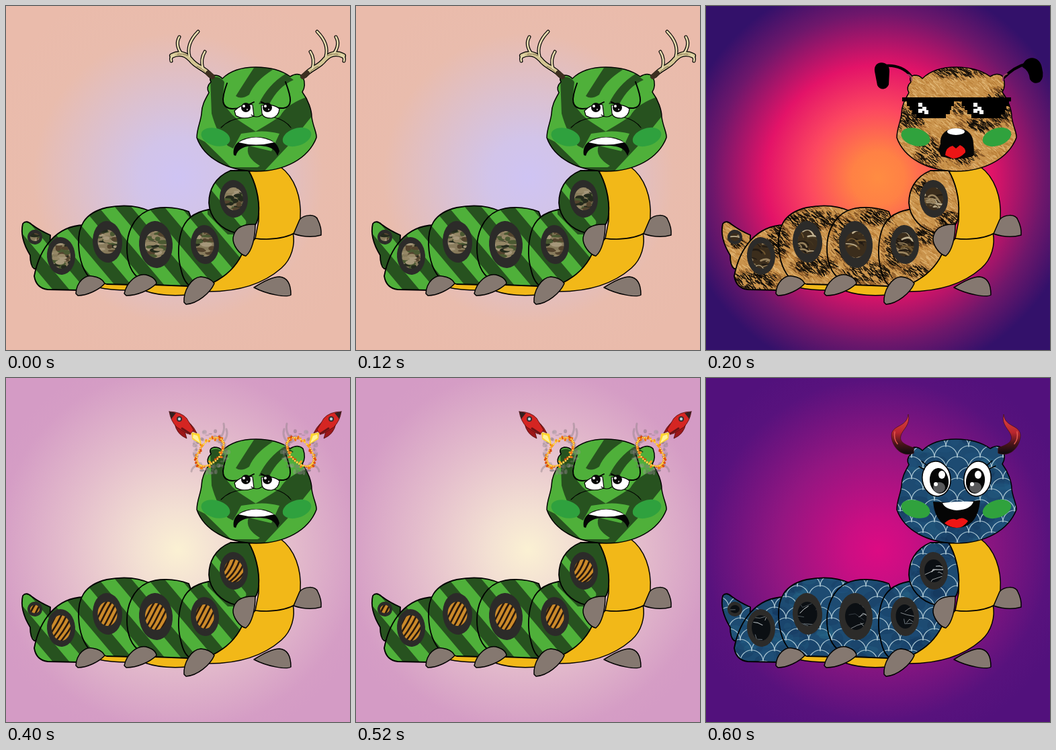
Animation, 512 px wide and 512 px high, one loop 0.8 s. Source, as an HTML page with a canvas:

```html
<!DOCTYPE html>
<html lang="en">
<head>
<meta charset="utf-8">
<title>Caterpillar costumes</title>
<style>
html, body { margin: 0; width: 100%; height: 100%; overflow: hidden; }
canvas { display: block; width: 100vw; height: 100vh; }
</style>
</head>
<body>
<canvas id="stage" width="512" height="512"></canvas>
<script>
const SIZE = 512, HOLD = 200, TAU = Math.PI * 2;
let g, seed;

const rnd = () => (seed = (seed * 16807) % 2147483647) / 2147483647;
const pick = list => list[Math.floor(rnd() * list.length)];

function layer(draw) {
  const c = document.createElement('canvas'), outer = g;
  c.width = c.height = SIZE;
  g = c.getContext('2d');
  g.lineCap = g.lineJoin = 'round';
  draw();
  g = outer;
  return c;
}
function shape(d, fill, line = 0, color = '#000') {
  const p = new Path2D(d);
  if (fill) { g.fillStyle = fill; g.fill(p); }
  if (line) { g.lineWidth = line; g.strokeStyle = color; g.stroke(p); }
}
function oval(x, y, rx, ry, fill, turn = 0) {
  g.fillStyle = fill;
  g.beginPath();
  g.ellipse(x, y, rx, ry, turn, 0, TAU);
  g.fill();
}
const stroke = (d, w, color = '#000') => shape(d, null, w, color);

// Draws a part and its reflection; the two sides add up to sum.
function mirrored(sum, draw) {
  draw();
  g.save();
  g.translate(sum, 0);
  g.scale(-1, 1);
  draw();
  g.restore();
}
function backdrop(stops) {
  const r = g.createRadialGradient(256, 256, 0, 256, 256, 300);
  stops.forEach(([at, color]) => r.addColorStop(at, color));
  g.fillStyle = r;
  g.fillRect(0, 0, SIZE, SIZE);
}
function flood(color) {
  g.fillStyle = color;
  g.fillRect(0, 0, SIZE, SIZE);
}

// Skins

function jungle() {
  const dark = '#27521f';
  flood('#4fb03a');
  for (let x = -210; x < 400; x += 49) stroke(`M${x} 250L${x + 160} 440`, 19, dark);
  shape('M300 240H378V340H330L300 310Z', dark);
  stroke('M303 262L352 322', 11, '#4fb03a');
  shape('M304 108Q316 101 325 113L322 142Q336 165 352 174L372 187L350 190L338 212L330 208Q314 190 306 160Z', dark);
  shape('M369 92Q384 89 397 95Q370 112 362 132Q350 140 342 134Q354 115 369 92Z', dark);
  shape('M416 101L428 110Q405 120 392 146H376Q390 117 416 101Z', dark);
  shape('M452 134L456 163L419 209L386 244L362 247L378 238Q355 224 361 208L395 216L407 190Q388 185 371 187Q397 172 408 164Q418 145 452 134Z', dark);
  shape('M284 196L296 202L340 245L320 236Q292 218 284 196Z', dark);
}
const blots = [[370, 96, 42, 9], [300, 166, 23, 16], [436, 148, 22, 25], [329, 217, 18, 24], [407, 175, 28, 10],
  [381, 221, 24, 13], [374, 151, 10, 10], [323, 270, 16, 12], [360, 319, 18, 17], [106, 348, 16, 25], [72, 407, 35, 15],
  [156, 316, 44, 15], [160, 385, 32, 14], [205, 346, 18, 33], [248, 312, 25, 12], [240, 395, 38, 17],
  [280, 360, 19, 28], [323, 340, 20, 13], [309, 392, 20, 10], [42, 350, 14, 9]];
function leopard() {
  flood('#c9934c');
  for (let i = 0; i < 15000; i++) {
    const x = 15 + rnd() * 455, y = 85 + rnd() * 350;
    const near = Math.min(...blots.map(([bx, by, rx, ry]) => Math.hypot((x - bx) / rx, (y - by) / ry)));
    const tone = near + rnd() * .35;
    const color = tone < 1.05 ? pick(['#080706', '#15100b', '#21170d'])
      : tone < 1.3 ? '#805225' : pick(['#c28a43', '#d4a15c', '#e0b574', '#b77c36']);
    stroke(`M${x} ${y}l${3 + rnd() * 4} ${2 + rnd() * 4}`, 1.2, color);
  }
}
function scales() {
  flood('#1d4b72');
  for (let i = 0; i < 500; i++) {
    g.globalAlpha = .17;
    oval(rnd() * SIZE, 80 + rnd() * 350, 5 + rnd() * 13, 4 + rnd() * 9, pick(['#0b2347', '#102b54', '#2e7b99', '#245f8c']));
  }
  g.globalAlpha = 1;
  for (let row = 0; row < 23; row++)
    for (let x = row % 2 * 17; x < 530; x += 34) {
      const y = 90 + row * 16;
      stroke(`M${x - 17} ${y + 12}A17 17 0 0 1 ${x + 17} ${y + 12}`, 1.2, '#a9c5d2');
    }
}

// Spot fillings

function camo() {
  flood('#887b5c');
  for (let i = 0; i < 1500; i++)
    oval(rnd() * 380, 260 + rnd() * 135, 3 + rnd() * 6, 1.5 + rnd() * 2.5, pick(['#a5977a', '#54442e', '#4b5932', '#242a1c', '#958766']));
}
function agate() {
  flood('#3b2d1c');
  for (let i = 0; i < 600; i++) {
    const x = rnd() * 380, y = 260 + rnd() * 130;
    stroke(`M${x} ${y}q${8 + rnd() * 8} ${-8 + rnd() * 8} ${16} ${rnd() * 8}`, 1 + rnd() * 2, pick(['#211a13', '#6e552f', '#9b8560', '#c0b292', '#453721']));
  }
}
function tiger() {
  flood('#cb8a2a');
  for (let x = -150; x < 520; x += 8)
    stroke(`M${x} 400q20 -20 34 -50t38 -45t30 -50`, 2.7, '#2b1a0d');
}
function cracks() {
  flood('#0b0f13');
  for (let i = 0; i < 190; i++) {
    const x = rnd() * 380, y = 260 + rnd() * 130;
    stroke(`M${x} ${y}l${rnd() * 10} ${rnd() * 14 - 7}l${4 + rnd() * 13} ${rnd() * 20 - 10}`, .5 + rnd() * .7, pick(['#a8afb2', '#606970', '#dce0e1']));
  }
}

// Body

const segments = [
  'M25 324Q30 318 38 325Q50 334 66 341L64 391L42 391Q36 387 36 371Q20 345 25 324Z',
  'M116 326C75 327 50 360 42 402Q45 420 62 422L108 423L150 405Z',
  'M216 306C195 296 170 296 150 300C115 308 107 330 108 355C109 382 117 398 128 408L150 414L190 415L230 380Z',
  'M272 306C250 298 225 298 210 305C188 315 180 340 180 360C180 385 188 399 200 407L220 415L272 417L300 380Z',
  'M310 302C285 304 270 314 263 330C256 348 255 372 260 390Q264 410 273 416L308 412Q338 397 351 370L343 330Z',
  'M334 245C310 255 302 275 302 293C303 315 320 333 343 338C360 338 375 330 376 310C378 285 370 260 361 245Z'
];
const belly = [
  'M128 408L150 413L192 415L182 423Q155 423 138 419Z',
  'M200 408L222 415L278 416L270 430Q232 433 207 424Z',
  'M371 346C395 349 420 343 427 337C431 355 425 377 410 390C385 412 350 425 302 425L308 412Q338 397 351 370Z',
  'M361 246L408 239C430 255 440 285 438 315Q437 330 433 336C415 347 390 348 371 346L376 320C378 287 370 260 361 246Z'
];
const feet = [
  'M104 428C105 410 118 400 128 402Q143 404 147 413C138 423 120 431 107 431Z',
  'M176 428C180 410 195 398 208 400Q223 404 224 413C214 423 195 431 179 431Z',
  'M265 441C264 425 275 404 290 403Q304 404 310 413C304 427 285 443 268 444Z',
  'M338 345C340 332 350 324 371 325C371 345 366 365 357 372C347 370 337 355 338 345Z',
  'M428 339L437 318C444 310 460 309 464 318Q470 330 469 341C455 345 440 343 428 339Z',
  'M369 419C380 412 395 403 407 403C419 404 424 415 424 430C418 434 390 430 369 419Z'
];
const spots = [[43, 344, 11, 11, 7, 6], [82, 372, 21, 28, 14, 19], [151, 351, 22, 31, 14.5, 18],
  [223, 355, 25, 35, 16, 20], [296, 355, 21, 29, 13.5, 18], [339, 287, 21, 28, 14, 17]];
const head = 'M305 113Q301 105 310 103Q318 103 322 108C335 95 355 91 372 91C395 91 412 97 423 105Q434 98 442 105Q447 119 441 128C450 140 455 155 455 165C457 180 463 189 462 196C450 227 415 246 372 246C330 245 295 227 284 196C284 182 290 172 291 160C291 148 297 138 302 129Q297 121 305 113Z';

function body(skin, filling) {
  segments.forEach((d, i) => {
    if (i === 1) belly.slice(0, 2).forEach(b => shape(b, '#f2b818', 1.5));
    if (i === 5) belly.slice(2).forEach(b => shape(b, '#f2b818', 1.5));
    shape(d, skin, 1.8);
  });
  spots.forEach(([x, y, rx, ry, ix, iy]) => {
    oval(x, y, rx, ry, '#2c2b29', -.06);
    oval(x, y, ix, iy, filling, -.06);
  });
  feet.forEach(d => shape(d, '#857870', 1.5));
  shape(head, skin, 1.5);
}
function cheeks(color) {
  oval(312, 195, 22, 13, color, .27);
  oval(433, 195, 22, 13, color, -.32);
}

// Faces

function sad() {
  cheeks('#2fa13e');
  stroke('M329 115C320 139 320 152 337 153Q351 153 369 143', 2);
  stroke('M416 113C425 137 427 150 413 152Q399 153 380 143', 2);
  shape('M340 156Q352 144 367 147L369 164Q352 170 342 163Z', '#fff', 1.2);
  shape('M380 148Q398 145 407 153Q406 165 395 167Q383 167 381 160Z', '#fff', 1.2);
  [357, 389].forEach(x => {
    oval(x, 151, 7, 7, '#080808');
    oval(x - 3, 149, 2, 2, '#fff');
    oval(x + 2, 154, 1.2, 1.2, '#aaa');
  });
  stroke('M320 181Q333 168 350 167M400 166Q416 170 424 181M365 162Q373 168 381 162', 1.1);
  shape('M339 222C336 205 350 195 373 195C395 195 405 205 407 216L404 223C400 211 390 208 372 208C355 208 345 212 342 223Z', '#050505');
  shape('M346 203Q372 188 399 203Q372 210 346 203Z', '#fff');
}
function cool() {
  cheeks('#30a23d');
  g.fillStyle = '#000';
  g.fillRect(292, 136, 162, 6);
  [299, 381].forEach(x => {
    [[0, 70], [4, 62], [8, 56], [14, 44]].forEach(([dx, w], i) => g.fillRect(x + dx, 142 + i * 6, w, 7));
  });
  g.fillStyle = '#fff';
  [316, 398].forEach(x => {
    [[0, 0], [6, 6], [0, 9], [9, 11]].forEach(([dx, dy]) => g.fillRect(x + dx, 144 + dy, 6, 6));
  });
  shape('M349 205C348 190 358 182 373 182C390 182 398 192 398 205Q400 220 397 224Q374 231 350 224L346 214Z', '#050505');
  oval(372, 187, 13, 5, '#fff');
  shape('M356 222Q357 210 367 208L372 212L378 207Q387 211 386 218Q378 227 367 227Z', '#ed1515');
}
function happy() {
  cheeks('#30a23d');
  [[343, 150, 21, -.15, 4], [404, 150, 20, .15, -3]].forEach(([x, y, rx, turn, dx]) => {
    g.lineWidth = 1.5;
    oval(x, y, rx, 26, '#fff', turn);
    g.strokeStyle = '#000';
    g.stroke();
    oval(x + dx, y + 3, 14, 19, '#050505', turn);
    oval(x + dx, y + 13, 9, 8, '#59595b');
    oval(x + dx + 4, y - 6, 5, 6, '#fff');
    oval(x + dx - 5, y + 8, 3, 3, '#fff');
  });
  stroke('M329 130l-8 -6M325 136l-8 -4M418 130l8 -7M422 135l9 -4', 1.4);
  shape('M338 184Q373 187 408 182C406 207 395 223 373 223C350 222 340 207 338 184Z', '#050505');
  shape('M352 186Q375 183 398 184Q394 196 373 197Q355 195 352 186Z', '#fff');
  shape('M355 216Q365 207 373 211Q382 205 390 213Q383 223 373 223Q362 222 355 216Z', '#ed1515');
}

// Headgear

function antlers() {
  mirrored(749, () => {
    const beam = 'M304 103C295 92 283 91 275 80Q263 66 247 74';
    const tines = 'M273 75Q268 56 286 38M262 72Q251 58 258 46M250 73Q244 76 246 82M293 93Q289 79 296 68';
    stroke(beam, 8);
    stroke(tines, 5);
    stroke(beam, 5.5, '#d3c593');
    stroke(tines, 2.7, '#e4d9ac');
    stroke('M284 90Q291 92 296 98M271 74Q262 70 255 72', 1, '#796946');
    stroke('M301 100L307 105', 8, '#3d3021');
  });
}
function antennae() {
  stroke('M305 104C298 95 285 87 266 89M443 107Q458 91 477 86', 4);
  shape('M251 97C249 79 274 81 273 97L272 117C268 126 258 125 255 118Z', '#000');
  shape('M471 91C473 73 497 72 500 92Q504 107 497 113Q488 118 482 109Q481 96 471 91Z', '#000');
  stroke('M300 102Q307 103 306 111M448 101Q441 103 442 111', 2, '#9d4262');
}
function rockets() {
  mirrored(742, () => {
    seed = 91;
    for (let i = 0; i < 75; i++) {
      const a = rnd() * TAU, r = 22 + rnd() * 10;
      g.globalAlpha = .35;
      oval(304 + Math.cos(a) * r * .85, 110 + Math.sin(a) * r, 1 + rnd() * 3, 1 + rnd() * 3, pick(['#847b80', '#a699a0', '#665d62']));
    }
    g.globalAlpha = .45;
    stroke('M314 94Q327 83 324 68M320 99Q332 88 328 76M285 130Q277 132 276 139', 3, '#8e8187');
    g.globalAlpha = 1;
    for (let a = 0; a < TAU; a += .16) {
      const u = Math.cos(a) * 25, v = Math.sin(a) * 15;
      const x = 304 + u * .66 + v * .75, y = 110 - u * .75 + v * .66;
      stroke(`M${x} ${y}l${rnd() * 8 - 4} ${rnd() * 8 - 4}`, 3, pick(['#ef7813', '#f9a01b', '#db4e0c']));
      oval(x, y, 1.2, 1.2, '#ffe15b');
    }
    shape('M276 81L288 83L291 99L277 91Z', '#ffd32e');
    shape('M279 84L285 86L289 97L278 89Z', '#fff29b');
    shape('M262 60Q276 65 284 82L273 77ZM251 68Q254 84 269 90L266 79Z', '#9d1719', .8, '#4d1012');
    shape('M243 50Q260 50 269 60L279 77Q277 83 270 83L254 73Q245 64 243 50Z', '#d52522', .8, '#4d1012');
    shape('M243 50L253 52L246 61Z', '#332020');
    stroke('M262 75L274 83', 3, '#6c1517');
    oval(258, 61, 4, 4, '#332e32');
    oval(258, 61, 2.2, 2.2, '#b7ccd3');
  });
}
function horns() {
  const fade = g.createLinearGradient(0, 55, 0, 113);
  [[0, '#e04342'], [.45, '#b9262e'], [.73, '#4c151a'], [1, '#0d0b0d']].forEach(s => fade.addColorStop(...s));
  mirrored(744, () => {
    shape('M309 112C290 119 276 101 276 85C277 69 299 74 301 54C305 70 292 77 290 86C287 97 300 100 309 104Z', fade, .7, '#401216');
    stroke('M281 80Q279 91 285 98', 1.5, '#e45b50');
  });
}

const costumes = [
  { bg: [[0, '#cfc4f3'], [.2, '#d2c4e9'], [.72, '#e9bcad'], [1, '#eabbab']], skin: jungle, filling: camo, face: sad, gear: antlers },
  { bg: [[0, '#ff8c42'], [.13, '#ff8145'], [.34, '#fc4860'], [.56, '#e31368'], [.82, '#6e176b'], [1, '#33116a']], skin: leopard, filling: agate, face: cool, gear: antennae },
  { bg: [[0, '#fbf1d3'], [.2, '#f3e0d3'], [.55, '#e4bdcc'], [.9, '#d59dc5'], [1, '#d49bc5']], skin: jungle, filling: tiger, face: sad, gear: rockets },
  { bg: [[0, '#dc0b83'], [.15, '#cb0e83'], [.5, '#931681'], [.85, '#58127d'], [1, '#52117c']], skin: scales, filling: cracks, face: happy, gear: horns }
];
const scenes = costumes.map(({ bg, skin, filling, face, gear }) => layer(() => {
  seed = 4321;
  const texture = draw => g.createPattern(layer(draw), 'no-repeat');
  backdrop(bg);
  body(texture(skin), texture(filling));
  face();
  gear();
}));

const stage = document.getElementById('stage').getContext('2d');
const start = performance.now();
function tick() {
  const t = performance.now() - start;
  stage.drawImage(scenes[Math.floor(t / HOLD) % scenes.length], 0, 0);
  requestAnimationFrame(tick);
}
tick();
</script>
</body>
</html>
```
